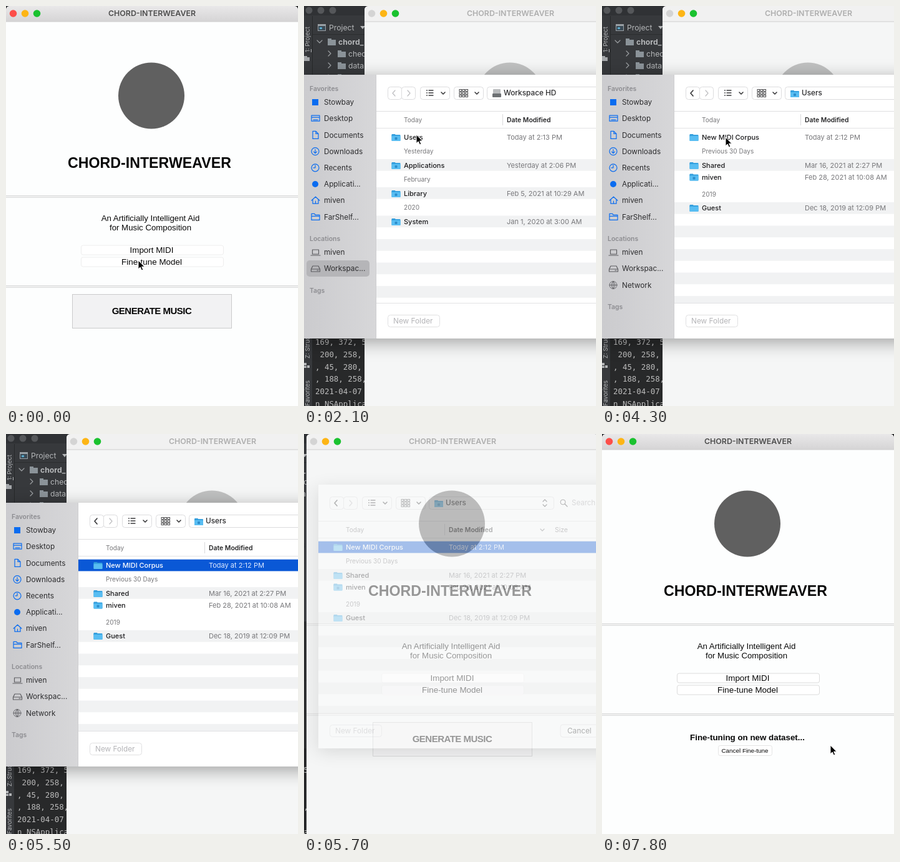
Recreate the animation shown at these times as an HTML page. Size 468 by 640 pixels, loop 7900 ms.

```html
<!DOCTYPE html>
<html lang="en">
<head>
<meta charset="utf-8">
<title>Music composition aid</title>
<style>
  html, body { margin: 0; width: 100%; height: 100%; overflow: hidden; background: #242526; }
  svg { display: block; width: 468px; height: 640px; }
  text { white-space: pre; }
  .ui { font-family: Inter, sans-serif; }
  .app { font-family: "Liberation Sans", Arial, sans-serif; }
  .mono { font-family: "DejaVu Sans Mono", monospace; }
  #dialog { filter: drop-shadow(0 6px 14px rgba(0, 0, 0, .35)); }
</style>
</head>
<body>
<svg id="stage" viewBox="0 0 468 640"></svg>
<script>
const LOOP = 7900, STEP = 100, SHIFT = 97;
const BLUE = '#0a6cf0', GREY = '#77777a';
const APP = 'CHORD-INTERWEAVER', USER = 'miven';

const rect = (x, y, w, h, fill, extra = '') =>
  `<rect x="${x}" y="${y}" width="${w}" height="${h}" fill="${fill}" ${extra}/>`;
const circle = (x, y, r, fill, extra = '') =>
  `<circle cx="${x}" cy="${y}" r="${r}" fill="${fill}" ${extra}/>`;
const path = (d, color, width = 1.2) =>
  `<path d="${d}" fill="none" stroke="${color}" stroke-width="${width}" stroke-linecap="round" stroke-linejoin="round"/>`;
const text = (s, x, y, size, fill, cls = 'ui', extra = '') =>
  `<text x="${x}" y="${y}" font-size="${size}" fill="${fill}" class="${cls}" ${extra}>${s}</text>`;
const group = (id, body) => `<g id="${id}">${body}</g>`;
const BOLD = 'font-weight="700"', SEMI = 'font-weight="600"', MEDIUM = 'font-weight="500"';
const MID = 'text-anchor="middle"';

const folder = (x, y, front = '#58bdf2') =>
  rect(x, y - 5, 6, 4, '#2c97d8', 'rx="1"') + rect(x, y - 4, 14, 10, '#36a2e0', 'rx="1"') +
  rect(x, y - 2, 14, 8, front, 'rx="1"');
const glyph = (x, y) => rect(x + 5, y, 4, 4, '#2c8dcb', 'rx="1"');

function ide() {
  const dim = '#b4b6b8', panel = '#37393c';
  const tree = (name, x, y, open, extra) =>
    path(open ? `M${x} ${y - 2}l4 4 4-4` : `M${x + 2} ${y - 4}l4 4-4 4`, '#9a9da0') +
    rect(x + 17, y - 5, 6, 4, '#8b9399') + rect(x + 17, y - 3, 13, 9, '#8b9399') +
    text(name, x + 34, y + 5, 12.2, dim, 'ui', extra);
  const side = (s, y) => text(s, 0, 0, 9.5, dim, 'ui', `transform="translate(9 ${y}) rotate(-90)"`);
  const log = ['169, 372, 5', ' 200, 258,', ', 45, 280,', ', 188, 258,', '2021-04-07', 'n NSApplica'];
  return rect(0, 0, 115, 640, '#28292a') + rect(0, 0, 14, 640, panel) + rect(14, 0, 100, 300, panel) +
    rect(0, 0, 115, 15, '#303235') + rect(13, 16, 1, 624, '#27292a') + rect(14, 45, 100, 1, '#2b2d2f') +
    [8, 27, 46].map(x => circle(x, 7, 5.5, '#55575a')).join('') +
    side('1: Project', 74) + rect(11, 69, 1, 5, dim) +
    rect(0, 80, 5, 3, '#a4a7aa') + rect(0, 82, 9, 6, '#a4a7aa') +
    rect(22, 29, 13, 11, '#9aa0a5') + rect(23, 32, 11, 7, '#3a4a55') + rect(25, 34, 4, 3, '#59a7c9') +
    text('Project', 40, 39, 12.2, dim) + `<path d="M90 32h8l-4 5z" fill="${dim}"/>` +
    tree('chord_', 21, 57, true, BOLD) + tree('chec', 37, 76) + tree('data', 37, 95) + tree('', 37, 114) +
    side('Z: Structure', 564) + rect(0, 571, 4, 4, dim) + rect(5, 575, 4, 4, dim) + rect(0, 576, 4, 3, dim) +
    side('Favorites', 640) +
    log.map((s, i) => text(s, 18, 542 + i * 19.8, 12.4, '#bcbcbc', 'mono')).join('');
}

function mainWindow() {
  const button = (y, label) =>
    rect(120.5, y - 7.5, 228, 15, '#fff', 'rx="3" stroke="#dedede" class="btn"') +
    text(label, 233.5, y + 4.5, 13.4, '#080808', 'app', MID);
  const rule = y => rect(0, y, 468, 4, '#f0f0f0') + rect(0, y, 468, 1, '#d9d9d9') + rect(0, y + 3, 468, 1, '#dedede');
  return `<path id="body" d="M0 640V7Q0 0 7 0H461Q468 0 468 7V640Z"/>` +
    `<path id="bar" d="M0 25V7Q0 0 7 0H461Q468 0 468 7V25Z"/>` + rect(0, 24.5, 468, 1, '#cfcfcf') +
    circle(11.5, 12, 5.8, '#fc4e49', 'id="close"') + circle(30.5, 12, 5.8, '#fdb515') + circle(49.5, 12, 5.8, '#1ac22f') +
    text(APP, 234, 16.4, 12.4, '#4c4c4c', 'ui', `${SEMI} ${MID} id="title"`) +
    group('content',
      circle(233, 143.5, 53, '#606060') +
      text(APP, 230, 259, 23.2, '#080808', 'app', `${BOLD} ${MID}`) + rule(303) + rule(447) +
      text('An Artificially Intelligent Aid', 231.5, 344, 13.25, '#080808', 'app', MID) +
      text('for Music Composition', 231.5, 359, 13.25, '#080808', 'app', MID) +
      button(390.5, 'Import MIDI') + button(409.5, 'Fine-tune Model') +
      group('generate', rect(106.5, 461.5, 255, 54, '#f2f2f3', 'stroke="#cbcbcb"') +
        text('GENERATE MUSIC', 233.5, 493, 15, '#080808', 'app', `${BOLD} ${MID} letter-spacing="-.5"`)) +
      group('tuning', text('Fine-tuning on new dataset...', 233, 490, 13.35, '#080808', 'app', `${BOLD} ${MID}`) +
        rect(186.5, 498.5, 86, 16, '#fff', 'rx="3" stroke="#e4e4e4"') +
        text('Cancel Fine-tune', 229, 509.5, 9.85, '#080808', 'app', MID)));
}

// Sidebar glyphs, drawn around (18, y)
const icons = {
  square: (y, c) => rect(13, y - 5, 10, 10, c),
  disc: (y, c) => circle(18, y, 5, c),
  desk: (y, c) => path(`M12 ${y - 5}h13v9h-13zM12 ${y - 2}h13M15 ${y + 2}h7`, c),
  doc: (y, c) => path(`M14 ${y - 6}h5l4 4v8h-9zM19 ${y - 6}v4h4`, c),
  down: (y, c) => path(`M24 ${y}a6 6 0 1 0-12 0a6 6 0 1 0 12 0M18 ${y - 3}v6m-2.5-2.5l2.5 2.5 2.5-2.5`, c),
  clock: (y, c) => path(`M24 ${y}a6 6 0 1 0-12 0a6 6 0 1 0 12 0M18 ${y - 4}v4h-3`, c),
  home: (y, c) => path(`M12 ${y}l6.5-6 6.5 6M14 ${y - 1}v6h9v-6M18.5 ${y + 5}v-4`, c),
  folder: (y, c) => path(`M12 ${y - 5}h5l1 2h7v8h-13zM12 ${y - 1}h13`, c),
  laptop: (y, c) => path(`M13.5 ${y - 4}h10v7h-10zM11 ${y + 5}h15`, c),
  disk: (y, c) => path(`M14 ${y - 4}h9l2.5 5v4h-14v-4zM11.5 ${y + 1}h14M21 ${y + 3}h2`, c),
  globe: (y, c) => path(`M24 ${y}a6 6 0 1 0-12 0a6 6 0 1 0 12 0M12 ${y}h12M18 ${y - 6}v12M18 ${y - 6}q-6 6 0 12q6-6 0-12`, c, .9),
};
const favorites = [['Stowbay', 'square'], ['Desktop', 'desk'], ['Documents', 'doc'], ['Downloads', 'down'],
  ['Recents', 'clock'], ['Applicati...', 'disc'], [USER, 'home'], ['FarShelf...', 'folder']];

const sideItem = ([name, icon], y, color = '#5e5e62') =>
  icons[icon](y, color) + text(name, 32, y + 4.2, 11.8, '#2d2d2f');
const heading = (s, y) => text(s, 9, y + 3.8, 10.4, '#8c8c90', 'ui', SEMI);
const fileRow = ([y, name, date], ink = '#1c1c1e', dateInk = GREY) =>
  folder(140.5, y) + text(name, 160, y + 4, 11, ink, 'ui', MEDIUM) + text(date, 325, y + 4, 11, dateInk);
const groupRow = ([y, name]) => text(name, 160, y + 3.7, 10.1, GREY);
const stripes = tops => tops.map(y => rect(116, y, 600, Math.min(18.7, 475 - y), '#f1f2f3')).join('');

const corpus = [210, 'New MIDI Corpus', 'Today at 2:12 PM'];
const usersDir = [210, 'Users', 'Today at 2:13 PM'];

function sidebar() {
  return rect(0, 110, 116, 422, 'url(#side)') + rect(115.5, 110, 1, 422, '#c6c6c8') +
    group('rootSide', rect(4, 407, 101, 26, '#b5b5b8', 'rx="5"') + heading('Tags', 455)) +
    group('usersSide', sideItem(['Network', 'globe'], 446.5) + heading('Tags', 481)) +
    heading('Favorites', 132) + favorites.map((f, i) => sideItem(f, 154 + i * 26.2, BLUE)).join('') +
    heading('Locations', 372) + sideItem([USER, 'laptop'], 394) + sideItem(['Workspac...', 'disk'], 420);
}

function dialog() {
  const ink = '#3a3a3c', backArrow = 'M146 135l-4 4.5 4 4.5';
  const box = (x, w) => rect(x + .5, 129.5, w, 20, '#fff', 'rx="4" stroke="#dcdcde"');
  const caret = x => path(`M${x - 3} 138l3 3 3-3`, ink, 1.6);
  const place = name => text(name, 320, 143.3, 11.8, '#2c2c2e', 'ui', MEDIUM);
  const dots = [0, 1, 2].map(r => [0, 1, 2].map(c =>
    rect(249 + c * 5, 133.5 + r * 4.5, 3.6, 3, 'none', `stroke="${ink}" stroke-width=".9"`)).join('')).join('');
  const lines = [135, 139, 143].map(y => circle(197, y, .9, ink) + path(`M200 ${y}h7`, ink, 1.3)).join('');
  const root = stripes([245, 290, 335.5, 373, 410.5, 448]) +
    [usersDir, [255, 'Applications', 'Yesterday at 2:06 PM'], [300, 'Library', 'Feb 5, 2021 at 10:29 AM'],
      [345, 'System', 'Jan 1, 2020 at 3:00 AM']].map(r => fileRow(r) + glyph(140.5, r[0])).join('') +
    [[232, 'Yesterday'], [277, 'February'], [322, '2020']].map(groupRow).join('') +
    rect(303, 133, 12, 8, '#b9bbbd', 'rx="1"') + rect(302, 140, 14, 6, '#6d7073', 'rx="1"') + place('Workspace HD');
  const users = stripes([245, 314, 351.5, 389, 426.5, 464]) +
    [corpus, [255, 'Shared', 'Mar 16, 2021 at 2:27 PM'], [273.5, USER, 'Feb 28, 2021 at 10:08 AM'],
      [323, 'Guest', 'Dec 18, 2019 at 12:09 PM']].map(r => fileRow(r)).join('') +
    [[232, 'Previous 30 Days'], [301, '2019']].map(groupRow).join('') +
    folder(302, 140) + glyph(302, 140) + place('Users') + path(backArrow, ink, 1.6) +
    group('homeGlyph', glyph(140.5, 273.5));
  return group('sidebar', sidebar()) + rect(116, 110, 604, 422, '#fff') +
    rect(116, 168, 600, 1, '#dfdfe1') + rect(116, 195, 600, 1, '#e2e2e4') + rect(318, 173, 1, 18, '#d9d9db') +
    rect(116, 475, 600, 1, '#e2e2e4') +
    box(134, 22) + box(156, 22) + box(186, 47) + box(240, 47) + box(293, 200) +
    path(backArrow, '#bdbdc0') + path('M166 135l4 4.5-4 4.5', '#bdbdc0') +
    lines + caret(223) + dots + caret(277) +
    path('M476 137l3-3 3 3M476 142l3 3 3-3', ink) + circle(508, 138, 4, 'none', `stroke="${ink}"`) +
    path('M511 141l4 4', ink) + text('Search', 522, 143, 11.5, '#a5a5a8') +
    text('Today', 160, 185.7, 10.1, GREY) + text('Date Modified', 325, 185.8, 10.4, '#242426', 'ui', SEMI) +
    path('M472 181l3 3 3-3', GREY) + text('Size', 495, 186, 10.4, GREY) +
    group('root', root) + group('users', users) +
    group('pickUsers', picked(usersDir)) + group('pickCorpus', picked(corpus)) +
    rect(134.5, 494.5, 83, 19, '#fff', 'rx="4" stroke="#e0e0e2"') + text('New Folder', 143, 508, 11.8, '#b4b4b7') +
    rect(504, 494, 60, 20, '#fff', 'rx="4" stroke="#dcdcde"') + text('Cancel', 515, 508, 11.8, '#2c2c2e');
}

const picked = row => rect(116, 200.7, 600, 18.7, '#0a58d6') + fileRow(row, '#fff', '#dce8ff');
const arrow = '<path d="M0 0V14L3.2 11L5.5 16L7.8 15L5.6 10.2H10Z" fill="#000" stroke="#fff" stroke-width="1"/>';

document.getElementById('stage').innerHTML =
  `<defs><linearGradient id="side"><stop stop-color="#cbcbce"/><stop offset="1" stop-color="#d7d7d9"/></linearGradient>
   <linearGradient id="active" x2="0" y2="1"><stop stop-color="#e9e8e9"/><stop offset="1" stop-color="#d5d4d5"/></linearGradient></defs>` +
  rect(0, 0, 468, 640, '#242526') + group('ide', ide()) + group('main', mainWindow()) +
  group('dialog', dialog()) + group('cursor', arrow);

const el = id => document.getElementById(id);
const show = (id, on) => { el(id).style.display = on ? '' : 'none'; };
const set = (id, attrs) => { for (const k in attrs) el(id).setAttribute(k, attrs[k]); };

// time, window x, dialog y, dialog opacity, window content opacity
const camera = [[0, 0, 0, 0, 1], [900, 90, -14, .5, .5], [1000, 97, 0, 1, .35], [5600, 52, -15, .75, .45],
  [5700, 4, -29, .34, .62], [5800, 0, 0, 0, 1]];
// time, x, y
const pointer = [[0, 212, 407], [1000, 212, 407], [1800, 180, 206], [2700, 180, 205], [3300, 184, 207],
  [3800, 194, 209], [4300, 198, 210], [4700, 198, 210], [5200, 490, 495], [5900, 480, 488], [6400, 366, 498], [LOOP, 366, 498]];

function pointerAt(t) {
  const i = pointer.findIndex((p, n) => n && t < p[0]);
  const [a, b] = [pointer[i - 1], pointer[i]];
  const u = (t - a[0]) / (b[0] - a[0]), e = u * u * (3 - 2 * u);
  return [a[1] + (b[1] - a[1]) * e, a[2] + (b[2] - a[2]) * e];
}

function render(t) {
  const [, x, dy, alpha, content] = camera.filter(c => c[0] <= t).pop();
  const open = alpha > 0, inUsers = t >= 2500;
  set('ide', { transform: `translate(${x - SHIFT} 0)` });
  set('main', { transform: `translate(${x} 0)` });
  set('body', { fill: open ? '#f5f6f6' : '#fdfefe' });
  set('bar', { fill: open ? '#f1f1f1' : 'url(#active)' });
  set('close', { fill: open ? '#d4d4d4' : '#fc4e49' });
  set('title', { fill: open ? '#aeaeae' : '#4c4c4c' });
  set('content', { opacity: content });
  set('dialog', { transform: `translate(${x - SHIFT} ${dy})`, opacity: alpha });
  set('sidebar', { opacity: alpha * alpha });
  for (const b of document.querySelectorAll('.btn')) b.setAttribute('stroke', t < 900 || open ? '#eee' : '#dcdcdc');
  show('dialog', open);
  for (const id of ['root', 'rootSide']) show(id, !inUsers);
  for (const id of ['users', 'usersSide']) show(id, inUsers);
  show('homeGlyph', t >= 4100);
  show('pickUsers', t >= 2200 && !inUsers);
  show('pickCorpus', t >= 4600);
  show('generate', t < 6000);
  show('tuning', t >= 6000);
  set('cursor', { transform: `translate(${pointerAt(t).join(' ')})` });
}

const start = performance.now();
function tick() {
  const t = (performance.now() - start) % LOOP;
  render(Math.floor(t / STEP) * STEP);
  requestAnimationFrame(tick);
}
tick();
</script>
</body>
</html>
```
